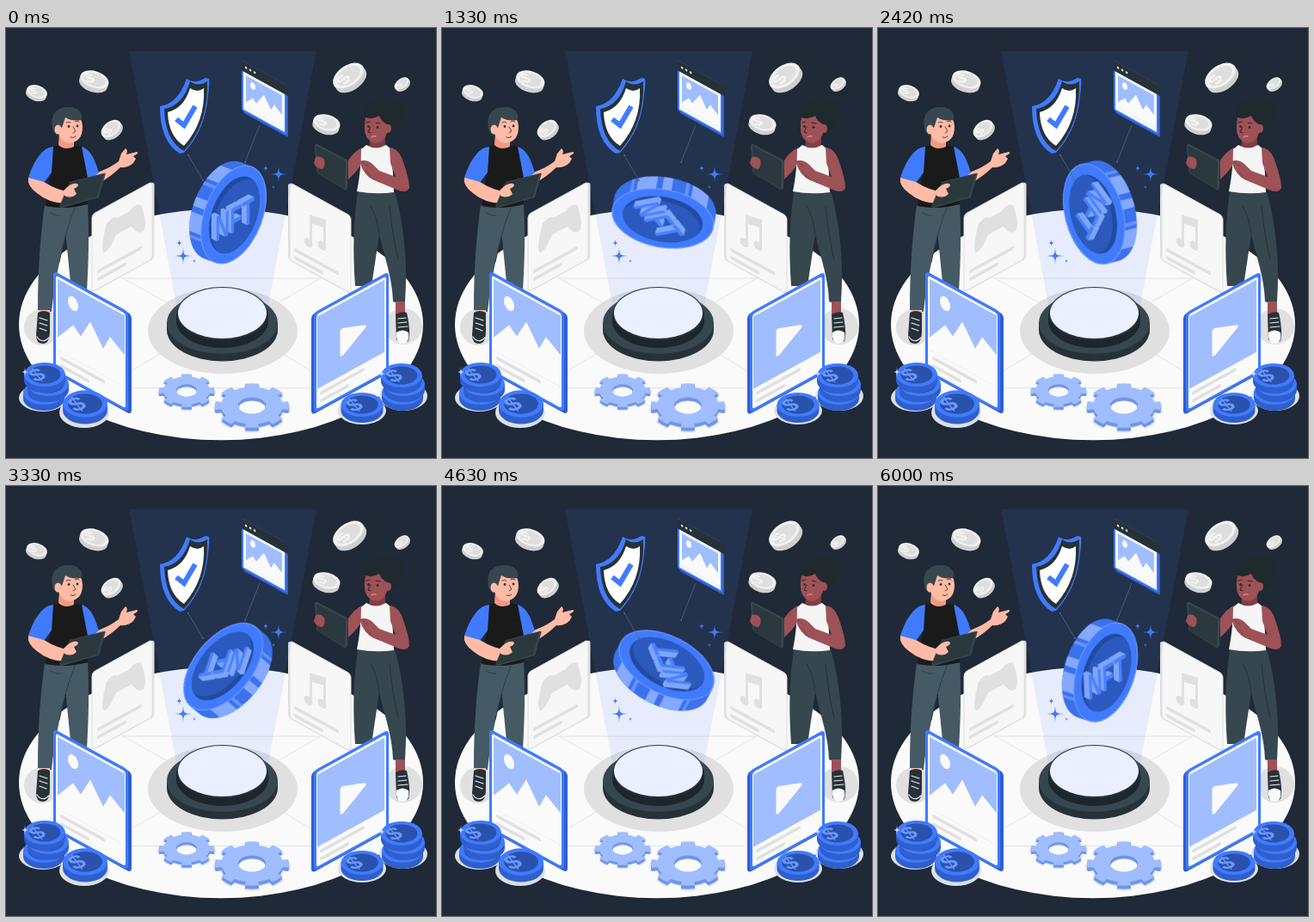
Animation of 500 by 500 pixels, one loop 6.04 s. Source, as an HTML page without scripts:

```html
<!DOCTYPE html>
<html lang="en">
<head>
<meta charset="utf-8">
<title>NFT stage</title>
<style>
html, body { margin: 0; width: 100%; height: 100%; overflow: hidden; background: #1f2937; }
svg { display: block; width: 100vw; height: 100vh; }
.spin { transform-origin: 258px 214.5px; animation: spin 6.04s linear infinite; }
@keyframes spin { to { transform: rotate(360deg); } }
.blue { --top: #407bff; --side: #2f5fcd; --in: #2a52ad; --sign: #6b98ff; }
.gray { --top: #f0f0f0; --side: #cfcfcf; --in: #dedede; --sign: #f5f5f5; }
.mark { font: bold 42px "Liberation Sans", Arial, sans-serif; text-anchor: middle; }
.sign { font: bold 26px "Liberation Sans", Arial, sans-serif; text-anchor: middle; }
.line { fill: none; stroke-linecap: round; stroke-linejoin: round; }
</style>
</head>
<body>
<svg viewBox="0 0 500 500">
<defs>
  <g id="disc">
    <path d="M-24 0V7A24 14 0 0 0 24 7V0Z" fill="var(--side)"/>
    <ellipse rx="24" ry="14" fill="var(--top)"/>
    <ellipse rx="18.5" ry="10.5" fill="var(--in)"/>
    <text class="sign" transform="matrix(1 -.35 .55 .7 -4 6.5)" fill="var(--sign)">$</text>
  </g>
  <g id="ring" fill="none" stroke="currentColor">
    <circle r="26" stroke-width="20"/>
    <circle r="38" stroke-width="10" pathLength="16" stroke-dasharray="1" stroke-dashoffset=".5"/>
  </g>
  <g id="gear">
    <use href="#ring" transform="translate(0 4) scale(1.04 .64)" color="#dfe2e8"/>
    <use href="#ring" transform="translate(0 4) scale(1 .6)" color="#6d95ea"/>
    <use href="#ring" transform="translate(0 2) scale(1 .6)" color="#6d95ea"/>
    <use href="#ring" transform="scale(1 .6)" color="#a0bdff"/>
  </g>
  <path id="star" d="M0-10C.4-1 1-.4 10 0C1 .4 .4 1 0 10C-.4 1-1 .4-10 0C-1-.4-.4-1 0-10Z"/>
  <path id="body" d="M-7-60H7A34 60 0 0 1 7 60H-7A34 60 0 0 1-7-60Z"/>
  <clipPath id="edge"><use href="#body"/></clipPath>
  <clipPath id="well"><ellipse cx="8" rx="26" ry="47"/></clipPath>
  <text id="mark" class="mark" transform="matrix(.56 -.3 0 1 264 236)">NFT</text>
  <g id="notes" fill="#e0e0e0">
    <rect width="52" height="4" rx="2"/>
    <rect y="9" width="34" height="4" rx="2"/>
  </g>
</defs>

<rect width="500" height="500" fill="#1f2937"/>

<!-- floor -->
<ellipse cx="250" cy="344.800" rx="235" ry="134.500" fill="#fafafa"/>
<path class="line" d="M100 271L190 321M400 271L314 321M137 291H366M100 418.500H400M188 374L140 402M314 374L360 402" stroke="#e4e4e4"/>
<g fill="#e0e0e0">
  <ellipse cx="252" cy="352" rx="87" ry="50"/>
  <ellipse cx="42" cy="348" rx="21" ry="21"/>
  <ellipse cx="462" cy="347" rx="22" ry="21"/>
</g>

<!-- back cards -->
<g transform="matrix(1 -.55 0 1 100 217)">
  <rect x="1.500" y="1" width="71" height="90" rx="4" fill="#e0e0e0"/>
  <rect width="70" height="90" rx="4" fill="#f7f7f7" stroke="#dedede"/>
  <path d="M17 20Q24 14 30 20H44Q50 14 57 20Q65 45 60 52Q54 54 46 39H28Q20 54 14 52Q9 45 17 20Z" fill="#e0e0e0"/>
  <use href="#notes" x="6" y="68"/>
</g>
<g transform="matrix(1 .55 0 1 329 179)">
  <rect x="-1" y="1" width="73" height="90" rx="4" fill="#e0e0e0"/>
  <rect x="1" width="71" height="90" rx="4" fill="#f7f7f7" stroke="#dedede"/>
  <path d="M24 25L43 20V52H40V31L27 34V58H24Z" fill="#e0e0e0"/>
  <ellipse cx="22.500" cy="58" rx="5" ry="5" fill="#e0e0e0"/>
  <ellipse cx="38.500" cy="53" rx="5" ry="5" fill="#e0e0e0"/>
  <use href="#notes" x="6" y="73"/>
</g>

<!-- pedestal -->
<path d="M187 343V351A64.500 36.500 0 0 0 316 351V343Z" fill="#263238"/>
<ellipse cx="251.500" cy="343" rx="64.500" ry="36" fill="#37474f"/>
<path d="M198 332V341A53.500 31 0 0 0 305 341V332Z" fill="#1c262b"/>
<ellipse cx="251.500" cy="332" rx="53" ry="31" fill="#263238"/>
<ellipse cx="251.500" cy="331.500" rx="51.500" ry="29.500" fill="#fff"/>

<!-- light -->
<path d="M143 27H361L303 332A51.500 29.500 0 0 1 200 332Z" fill="#407bff" opacity=".11"/>

<!-- man -->
<g>
  <path d="M66 206L95 203C97 240 96 270 94 306L75 296Z" fill="#455a64"/>
  <path d="M45 206C40 240 37 280 37 328L53 330C57 290 66 250 80 206Z" fill="#455a64"/>
  <path class="line" d="M80 209Q68 240 62 272M51 214Q56 219 63 218" stroke="#2e3d44"/>
  <path d="M39 328H51V337H39Z" fill="#ffbba6"/>
  <path d="M37 331Q44 327 51 331L51 352Q51 367 43 367Q35 367 35 357Z" fill="#263238"/>
  <path class="line" d="M39 337L48 340M39 343L48 346M39 349L47 352M36 359Q42 368 50 360" stroke="#eee" stroke-width="1.200"/>
  <path d="M97 174L109 167Q122 162 131 155L134 146L139 140Q142 142 140 147L152 144Q156 145 148 149L151 152L148 157Q142 163 133 162Q122 173 107 181Z" fill="#ffbba6"/>
  <path d="M53 138Q71 133 89 138L94 168L95 205Q70 212 46 207Q53 175 53 138Z" fill="#1a1a1a"/>
  <path d="M55 138C41 139 31 158 26 174Q33 180 44 180L53 168Z" fill="#407bff"/>
  <path d="M88 138C100 142 104 156 108 168Q102 174 95 174Z" fill="#407bff"/>
  <path d="M26 174Q24 183 36 192Q50 204 70 204L76 191Q60 189 44 179Z" fill="#ffbba6"/>
  <path d="M74 179L113 169Q117 168 115 172L108 197L65 209Q61 209 63 205Z" fill="#37474f"/>
  <path d="M74 180L113 170L106 196L63 208Z" fill="#2b383e"/>
  <path d="M67 189Q76 179 83 181Q86 184 79 187L82 193Q76 199 68 195Z" fill="#ffbba6"/>
  <path d="M62 121L79 127V138Q68 143 61 136Z" fill="#f09a83"/>
  <path d="M60 107Q58 132 74 134Q89 132 89 115Q88 101 78 100Z" fill="#ffbba6"/>
  <path d="M55 120C49 100 60 92 72 92C85 91 92 102 87 107Q77 109 69 104L65 116L60 114Q62 122 59 125Z" fill="#37474f"/>
  <ellipse cx="60.500" cy="118" rx="4" ry="5.500" fill="#ffbba6"/>
  <path class="line" d="M70 110Q73 108 75 110M80 109Q83 107 85 109M78 115L81 120L78 122M75 127Q78 129 81 126" stroke="#743c33"/>
  <circle cx="73" cy="114.500" r="1.400" fill="#263238"/>
  <circle cx="83" cy="114" r="1.400" fill="#263238"/>
</g>

<!-- woman -->
<g>
  <path d="M409 190H452C461 220 468 270 464 318Q458 322 450 318C449 290 441 270 434 240L425 300H406C403 260 404 225 409 190Z" fill="#37474f"/>
  <path class="line" d="M434 240Q432 220 424 207M446 207Q449 240 456 270" stroke="#263238"/>
  <path d="M453 318H464V334H453Z" fill="#9d5257"/>
  <path d="M453 333Q460 329 466 331Q471 354 468 364Q459 369 454 362Z" fill="#263238"/>
  <path d="M454 354Q461 349 468 354Q470 367 460 367Q453 366 454 354Z" fill="#fafafa"/>
  <path class="line" d="M456 338L465 337M456 343L466 342M456 348L467 347" stroke="#eee" stroke-width="1.200"/>
  <path d="M414 139Q405 143 398 154V176Q407 168 414 158Z" fill="#9d5257"/>
  <g fill="#20292d">
    <circle cx="443" cy="103" r="17"/><circle cx="428" cy="98" r="11"/>
    <circle cx="451" cy="95" r="12"/><circle cx="439" cy="91" r="10"/>
  </g>
  <path d="M424 125H441V138Q432 144 422 138Z" fill="#7f3f44"/>
  <path d="M418 104Q413 131 430 134Q443 132 445 113Q436 109 434 102Q426 107 418 104Z" fill="#9d5257"/>
  <ellipse cx="444.500" cy="117" rx="3.500" ry="5" fill="#9d5257"/>
  <path class="line" d="M419 110L423 109M430 110L435 111M424 115L421 121L424 122" stroke="#43191f"/>
  <path class="line" d="M425 127Q427 125 430 126" stroke="#e77f7f" stroke-width="1.500"/>
  <circle cx="421.500" cy="114.500" r="1.300" fill="#1b2227"/>
  <circle cx="432" cy="115.500" r="1.300" fill="#1b2227"/>
  <path d="M413 141L419 136Q430 143 442 136L448 141L450 170L451 191Q430 194 408 190Q413 165 413 141Z" fill="#f5f5f5"/>
  <path d="M446 139Q457 140 462 156Q469 176 469 186Q466 192 457 189L428 177Q416 172 411 155Q419 152 426 158L434 166L453 173L447 157Z" fill="#9d5257"/>
  <path class="line" d="M413 155L421 161M427 176L419 166" stroke="#7f3f44"/>
  <path d="M362 135L396 153Q399 155 398 159L397 186Q396 190 392 187L364 170Q361 168 361 164L359 138Q359 134 362 135Z" fill="#37474f"/>
  <path d="M361 137L395 155L394 187L363 169Z" fill="#2b383e"/>
  <path d="M360 150Q366 148 370 153Q372 160 368 164Q361 164 358 157Z" fill="#9d5257"/>
</g>

<!-- front cards -->
<g transform="matrix(1 .55 0 1 57 283)">
  <rect x="1" y="1" width="88" height="117" rx="5" fill="#2f5fcd"/>
  <rect x="-2" width="87" height="117" rx="5" fill="#407bff"/>
  <rect x="1" y="4" width="81" height="110" rx="3" fill="#fafafa"/>
  <path d="M3 7H81V90H3Z" fill="#a0bdff"/>
  <path d="M3 75L21 51L30 59L41 36L56 59L64 41L81 53V90H3Z" fill="#fafafa"/>
  <ellipse cx="21" cy="26" rx="6" ry="8" fill="#fafafa"/>
  <use href="#notes" x="6" y="95"/>
</g>
<g transform="matrix(1 -.55 0 1 356 332)">
  <rect x="-1" y="1" width="88" height="117" rx="5" fill="#2f5fcd"/>
  <rect x="2" width="87" height="117" rx="5" fill="#407bff"/>
  <rect x="5" y="4" width="81" height="110" rx="3" fill="#fafafa"/>
  <path d="M6 7H84V91H6Z" fill="#a0bdff"/>
  <path d="M35 39V66L60 49Z" fill="#fafafa" stroke="#fafafa" stroke-width="5" stroke-linejoin="round"/>
  <use href="#notes" x="9" y="96"/>
</g>

<!-- gears -->
<use href="#gear" transform="translate(210 421.500) scale(.75)"/>
<use href="#gear" transform="translate(286 439)"/>

<!-- money -->
<g fill="#dcdfe5">
  <ellipse cx="43" cy="430" rx="28" ry="16"/>
  <ellipse cx="91" cy="447" rx="29" ry="18"/>
  <ellipse cx="462" cy="428" rx="28" ry="17"/>
  <ellipse cx="414" cy="445" rx="28" ry="16"/>
</g>
<g class="blue">
  <use href="#disc" x="44" y="424"/>
  <use href="#disc" x="49" y="414"/>
  <use href="#disc" x="45" y="403"/>
  <use href="#disc" transform="translate(92 437) scale(1.080 1.120)"/>
  <use href="#disc" x="461" y="424"/>
  <use href="#disc" x="463" y="414"/>
  <use href="#disc" x="460" y="404"/>
  <use href="#disc" transform="translate(414 438) scale(1.020 1)"/>
</g>
<g class="gray">
  <use href="#disc" transform="translate(36 74) rotate(18) scale(.51 .52)"/>
  <use href="#disc" transform="translate(103 60) rotate(18) scale(.71 .7)"/>
  <use href="#disc" transform="translate(122 117) rotate(-38) scale(.54 .58)"/>
  <use href="#disc" transform="translate(398 55.500) rotate(-35) scale(.84 .84)"/>
  <use href="#disc" transform="translate(460 64.500) rotate(-35) scale(.4 .4)"/>
  <use href="#disc" transform="translate(373 110) rotate(15) scale(.66 .66)"/>
</g>

<!-- shield -->
<path d="M210 59Q219 66 232 58L236 59Q237 64 235 78Q232 118 207 145L202 146Q179 132 179 91Q200 88 210 59Z" fill="#407bff"/>
<path d="M214 62Q223 69 234 62Q236 111 207 143Q185 131 184 94Q206 90 214 62Z" fill="#263238"/>
<path d="M214 70Q223 76 230 70Q232 109 207 137Q189 126 188 98Q207 93 214 70Z" fill="#fff"/>
<path d="M198 106L207 113L220 91" fill="none" stroke="#407bff" stroke-width="6"/>

<!-- window -->
<g transform="matrix(1 .55 0 1 275 38)">
  <rect x="1" y="1" width="52" height="59" rx="2" fill="#2f5fcd"/>
  <rect x="-1" width="52" height="58" rx="2" fill="#407bff"/>
  <path d="M-1 2Q-1 0 1 0H50L53 1V12H-1Z" fill="#263238"/>
  <path d="M1 12H49V56H1Z" fill="#fafafa"/>
  <path d="M4 15H46V52H4Z" fill="#a0bdff"/>
  <path d="M4 46L12 37L16 41L25 26L33 39L37 31L46 38V52H4Z" fill="#fafafa"/>
  <ellipse cx="12" cy="23" rx="3" ry="4" fill="#fafafa"/>
  <path class="line" d="M4 6H4.100M9 6H9.100M14 6H14.100" stroke="#fafafa" stroke-width="2.500"/>
</g>

<!-- token -->
<g class="spin">
  <g transform="translate(258 214.500) rotate(21)">
    <use href="#body" fill="#3b72ec"/>
    <g clip-path="url(#edge)">
      <path d="M-45-48H10V-28H-45ZM-45-4H10V7H-45ZM-45 14H10V36H-45Z" fill="#84a9ff"/>
      <path d="M-45-24H10V-20H-45ZM-45 40H10V43H-45Z" fill="#6593ff"/>
    </g>
    <ellipse cx="7" rx="33.600" ry="59.600" fill="#407bff" stroke="#7ca3ff" stroke-width=".8"/>
    <ellipse cx="8" rx="26" ry="47" fill="#234a9f"/>
    <ellipse cx="13" cy="2" rx="26" ry="47" fill="#2c59bd" clip-path="url(#well)"/>
  </g>
  <g fill="#7fa6fc">
    <use href="#mark" x="-4" y="-2"/><use href="#mark" x="-3" y="-1.500"/>
    <use href="#mark" x="-2" y="-1"/><use href="#mark" x="-1" y="-.5"/>
    <use href="#mark"/><use href="#mark" x="1" y=".5"/>
  </g>
  <use href="#mark" x="2" y="1" fill="#4a82fb"/>
</g>

<!-- links and sparkles -->
<path d="M212 148L229 177M295 113L278 156" stroke="#55647e" stroke-width=".8"/>
<g fill="#55647e">
  <circle cx="212" cy="148" r="1"/><circle cx="229" cy="177" r="1"/>
  <circle cx="278" cy="156" r="1"/>
</g>
<g fill="#407bff">
  <use href="#star" x="317" y="170"/>
  <use href="#star" transform="translate(302 163) scale(.5)"/>
  <use href="#star" transform="translate(311 185) scale(.3)"/>
  <use href="#star" x="206" y="265"/>
  <use href="#star" transform="translate(201.500 250) scale(.5)"/>
  <use href="#star" transform="translate(219 271) scale(.3)"/>
</g>
<g fill="#c9d9ff">
  <use href="#star" transform="translate(22 400) scale(.6)"/>
  <use href="#star" transform="translate(437 402) scale(.6)"/>
</g>
</svg>
</body>
</html>
```
